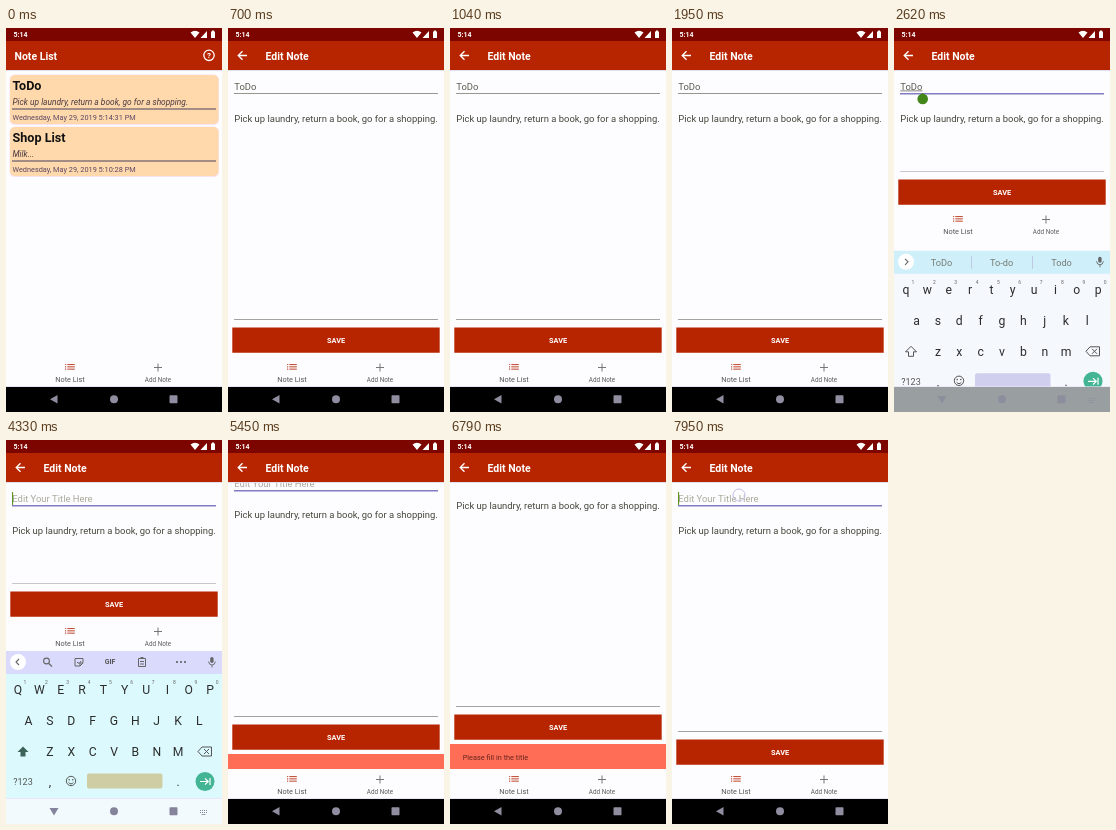
These frames come from a looping animation (216 px wide and 384 px high, 8 s). An HTML page with a canvas:

```html
<!DOCTYPE html>
<html>
<head>
<meta charset="utf-8">
<style>
html, body { margin: 0; height: 100%; overflow: hidden; background: #fff; }
canvas { display: block; width: 216px; height: 384px; }
</style>
</head>
<body>
<canvas width="216" height="384"></canvas>
<script>
const ctx = document.querySelector('canvas').getContext('2d');
const LOOP = 8000, OPEN_NOTE = 600, FOCUS = 2520, ERASE = 3400, HIDE = 5040;
const RED = '#b72400', INK = '#2c2c2c';

const ramp = (t, start, length) => Math.min(1, Math.max(0, (t - start) / length));
const smooth = p => p * p * (3 - 2 * p);

function rect(x, y, w, h, color, radius = 0) {
  ctx.fillStyle = color;
  ctx.beginPath();
  ctx.roundRect(x, y, w, h, radius);
  ctx.fill();
}
function fill(d, color) {
  ctx.fillStyle = color;
  ctx.fill(new Path2D(d));
}
function line(d, color, width = 1) {
  ctx.strokeStyle = color;
  ctx.lineWidth = width;
  ctx.stroke(new Path2D(d));
}
function circle(x, y, r, color, width) {
  ctx.beginPath();
  ctx.arc(x, y, r, 0, 7);
  ctx.fillStyle = ctx.strokeStyle = color;
  ctx.lineWidth = width || 1;
  width ? ctx.stroke() : ctx.fill();
}
// y is the middle of the capital letters
function text(s, x, y, size, color = INK, style = '', align = 'left') {
  ctx.font = `${style} ${size}px Roboto, sans-serif`;
  ctx.textAlign = align;
  ctx.fillStyle = color;
  ctx.fillText(s, x, y + size * 0.356);
}
function group(dy, alpha, draw) {
  ctx.save();
  ctx.translate(0, dy);
  ctx.globalAlpha *= alpha;
  draw();
  ctx.restore();
}

function header(title, editing) {
  rect(0, 42, 216, 1, '#e2deec');
  rect(0, 0, 216, 13, '#7c0500');
  rect(0, 13, 216, 29, RED);
  text('5:14', 7.5, 6.5, 7, '#fff', 'bold');
  fill('M184.5 4.5Q189 1 193.5 4.5L189 10Z M201 3V10H194.5Z M205 3.5H206V2.5H208V3.5H209V10H205Z', '#fff');
  text(title, editing ? 37.5 : 8.5, 28, 10.5, '#fff', 'bold');
  if (editing) {
    line('M19 27.5H10.5M14.5 23.2L10.2 27.5L14.5 31.8', '#fff', 1.3);
  } else {
    circle(203, 27.3, 5.2, '#fff', 1.3);
    text('?', 203, 27.5, 8, '#fff', 'bold', 'center');
  }
}

function card(y, title, body, date) {
  rect(3.5, y - 0.5, 209.5, 50.5, '#f6e4f2', 5.5);
  rect(4, y, 208.5, 49, '#ffd9ac', 5);
  text(title, 6.5, y + 11, 12.6, '#111', 'bold');
  text(body, 6.5, y + 27, 8.4, '#4a3a40', 'italic');
  rect(6, y + 33.5, 204, 1, '#49405f');
  text(date, 6.5, y + 42.5, 7.35, '#5a4664');
}

function listScreen() {
  card(47, 'ToDo', 'Pick up laundry, return a book, go for a shopping.', 'Wednesday, May 29, 2019 5:14:31 PM');
  card(99, 'Shop List', 'Milk...', 'Wednesday, May 29, 2019 5:10:28 PM');
}

function bottomTabs() {
  rect(0, 329, 216, 30, '#fdfdff');
  for (let i = 0; i < 3; i++) {
    const y = 336 + i * 2.3;
    rect(59, y, 1.2, 1.1, '#c5543c');
    rect(61.3, y, 7.5, 1.1, '#c5543c');
  }
  text('Note List', 64, 351, 7.35, '#555', '', 'center');
  line('M148 339.5H156M152 335.5V343.5', '#777', 1);
  text('Add Note', 152, 351.3, 6.3, '#5c5c5c', '', 'center');
}

function editScreen(t, title, keyboardUp) {
  const snack = smooth(ramp(t, 5320, 230)) - smooth(ramp(t, 7120, 230));
  const lift = -25 * snack, shrink = keyboardUp ? -148 : 0;
  const focused = t >= FOCUS;
  group(lift, 1, () => {
    text(title || 'Edit Your Title Here', 6.3, 58.5, 9.45, title ? '#5b5b50' : '#aaa99a');
    rect(6, 65, 204, focused ? 1.5 : 1, focused ? '#827cc4' : '#99968f');
    if (focused) {
      const width = title ? ctx.measureText(title).width : 0;
      const blinkBase = title ? FOCUS + 300 : t < HIDE ? ERASE + 500 : 5750;
      if (title) rect(6.3, 62.5, width, 0.8, '#666');
      if (Math.floor((t - blinkBase) / 500) % 2 === 0) rect(6 + width, 52, 1.1, 13, '#5b9420');
      if (t < ERASE) {
        circle(28.7, 71, 5.3, '#43871b');
        fill('M28.7 65L24.5 68H33Z', '#43871b');
      }
    }
    text('Pick up laundry, return a book, go for a shopping.', 6.3, 90.2, 9.45, '#46463c');
  });
  group(lift + shrink, 1, () => {
    rect(6, 291, 204, 1, keyboardUp ? '#c9c7cd' : '#a5a2a0');
    rect(4.3, 299.6, 207.4, 25.2, RED);
    text('SAVE', 108, 312.6, 7.35, '#fff', 'bold', 'center');
  });
  if (snack) {
    rect(0, 329 - 25 * snack, 216, 25 * snack, '#ff6d57');
    group(0, ramp(t, 5480, 100) - ramp(t, 7120, 100), () =>
      text('Please fill in the title', 12.7, 317.5, 7.35, '#66251c'));
  }
  group(shrink, 1, bottomTabs);
}

function strip(title) {
  rect(0, 211, 216, 23, title ? '#cfeffa' : '#d9dafc');
  circle(12, 222, 8, '#fff');
  line(title ? 'M11 219L14 222L11 225' : 'M13 219L10 222L13 225', '#666', 1.1);
  if (title) {
    [title, 'To-do', 'Todo'].forEach((word, i) => text(word, 47.5 + i * 60, 223, 9.2, '#777b72', '', 'center'));
    line('M77.5 216V229M138.5 216V229', '#b9bfdc', 0.8);
  } else {
    circle(40.5, 221, 2.9, '#666', 1.1);
    line('M42.6 223.2L46 226.6', '#666', 1.3);
    line('M69 218.5H77V223L74 226H69ZM77 223H74V226M71 222Q73 225 75 221', '#666');
    text('GIF', 104, 222, 7, '#555', 'bold', 'center');
    line('M132.5 218.5H139.5V226.5H132.5ZM134.5 217.5H137.5M134 221.5H138M134 224H138', '#666');
    for (let i = 0; i < 3; i++) circle(171 + i * 4, 222, 1, '#555');
  }
  rect(204.2, 217, 3.4, 6, '#666', 1.7);
  line('M202.5 221.5Q203 225 206 225Q209 225 209.3 221.5M206 225V227.5', '#666', 0.9);
}

function keyboard(title) {
  const caps = !title;
  rect(0, 211, 216, 190, caps ? '#dcfafd' : '#f5f8fd');
  strip(title);
  ['qwertyuiop', 'asdfghjkl', 'zxcvbnm'].forEach((keys, row) => {
    [...keys].forEach((key, i) => {
      const x = [12, 22.5, 44][row] + i * 21.35, y = 250 + row * 30.7;
      text(caps ? key.toUpperCase() : key, x, y, 12.2, INK, '', 'center');
      if (!row) text((i + 1) % 10, x + 7, 242.5, 5, '#666', '', 'center');
    });
  });
  const shift = 'M17 306.5L22.5 312H19.5V316.5H14.5V312H11.5Z';
  caps ? fill(shift, '#3d6259') : line(shift, '#555');
  line('M192 311.5L196 307H205.5V316H196ZM198 309L203 314M203 309L198 314', '#555', 1);
  text('?123', 17, 341.5, 9, '#555', '', 'center');
  text(',', 44, 341.5, 12, INK, '', 'center');
  circle(65, 341, 4.7, '#555', 1);
  circle(63.2, 339.7, 0.8, '#555');
  circle(66.8, 339.7, 0.8, '#555');
  line('M62.5 342.3Q65 345.5 67.5 342.3', '#555');
  rect(81, 333.5, 75.5, 15, caps ? '#cfcda4' : '#d0cfee', 2);
  text('.', 172, 341.5, 12, INK, '', 'center');
  circle(199, 341.5, 9.5, '#43b595');
  line('M194 341.5H202M199 338.3L202.2 341.5L199 344.7M204 338V345', '#fff', 1.2);
}

function systemBar(light) {
  const color = light ? '#85849c' : '#8f8d9f';
  rect(0, 358, 216, 1, '#e8e6f8');
  rect(0, 359, 216, 25, light ? '#f3fafd' : '#000');
  fill(light ? 'M43.5 368H52.5L48 375.5Z' : 'M51.5 367V375.5L44 371.3Z', color);
  circle(108, 371.3, 4, color);
  rect(163.5, 367.3, 8, 8, color, 0.7);
  if (light) {
    for (let y = 370; y < 374; y += 2)
      for (let x = 194; x < 202; x += 2) rect(x, y, 1, 1, color);
    rect(195.5, 374, 4, 0.8, color);
  }
}

function draw(t) {
  const editing = t >= OPEN_NOTE;
  const erased = t < ERASE ? 0 : Math.floor((t - ERASE) / 150) + 1;
  const title = 'ToDo'.slice(0, Math.max(0, 4 - erased));
  const shown = ramp(t, FOCUS, 160) - ramp(t, HIDE, 160);

  rect(0, 0, 216, 384, '#fdfdff');
  if (editing) {
    editScreen(t, title, t >= FOCUS && t < HIDE);
  } else {
    listScreen();
    bottomTabs();
  }
  header(editing ? 'Edit Note' : 'Note List', editing);
  systemBar(false);
  if (shown) {
    ctx.save();
    ctx.beginPath();
    ctx.rect(0, 0, 216, 359);
    ctx.clip();
    group(32 * (1 - shown), Math.min(1, shown * 1.6), () => keyboard(title));
    ctx.restore();
    // the bar turns light more slowly than the keys appear
    rect(0, 359, 216, 25, '#000');
    group(0, shown, () => systemBar(true));
  }
  if (t >= 7900) circle(67, 55, 6, '#c3bfe6', 1);
}

function tick(now) {
  draw(now % LOOP);
  requestAnimationFrame(tick);
}
requestAnimationFrame(tick);
</script>
</body>
</html>
```
